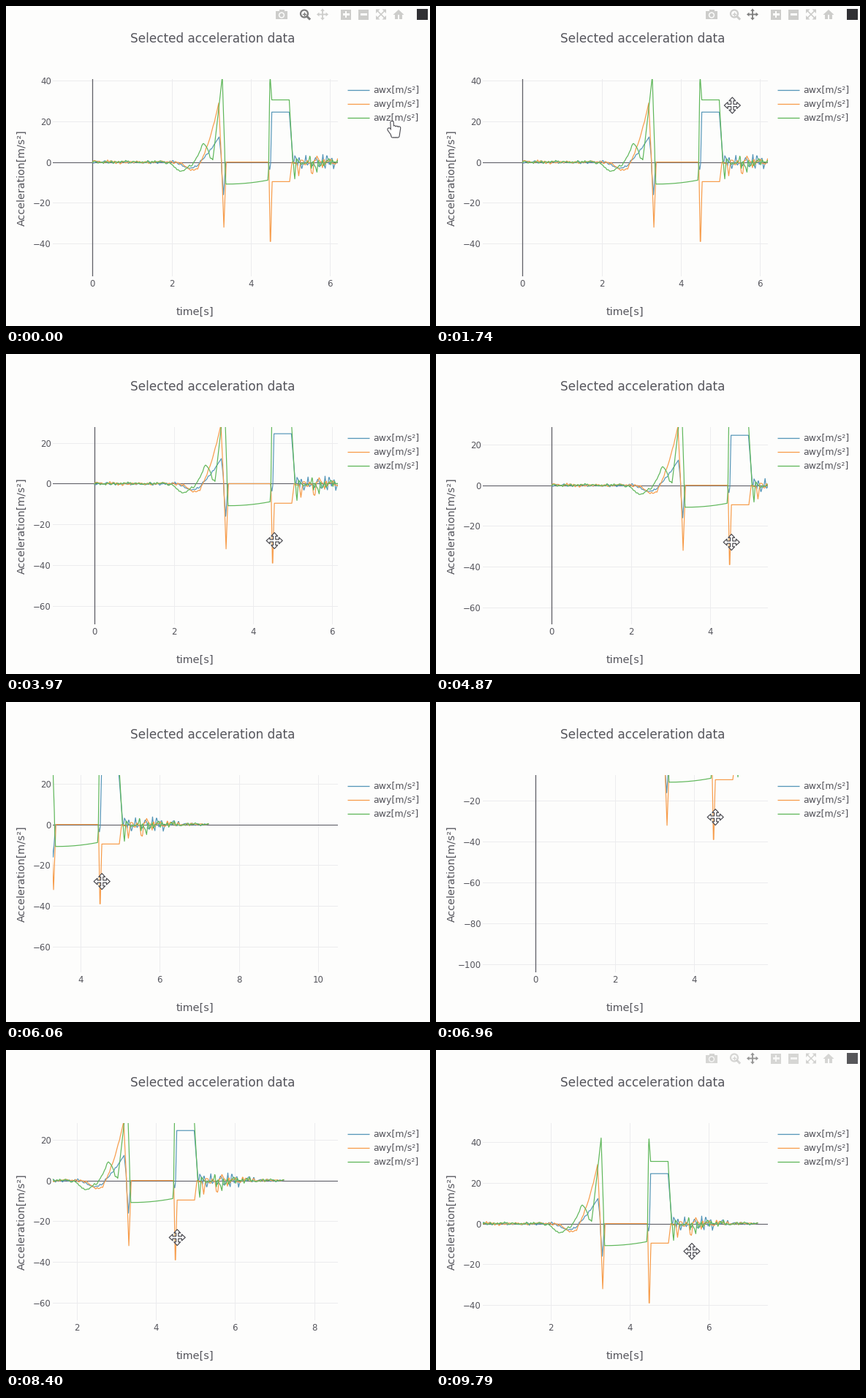
A matplotlib script for the animation above (9.84 s loop, 580x438 px).

```python
import matplotlib.pyplot as plt
import numpy as np
from matplotlib.animation import FuncAnimation
from matplotlib.patches import Circle, Polygon, Rectangle
from matplotlib.patheffects import Normal, Stroke
from matplotlib.ticker import MultipleLocator

W, H, DPI = 580, 438, 64
PT = 72 / DPI                      # points per pixel
FRAMES, STEP = 205, 48             # 9840 ms per loop
LEFT, RIGHT, TOP, BOTTOM = 64, 454, 100, 370
X_SCALE, Y_SCALE = 54.17, 2.79     # pixels per second, per m/s²

PAPER, INK, GRID, AXIS = "#fdfdfc", "#55555c", "#ececee", "#606068"
PALE, ACTIVE, DARK = "#cdcdcb", "#7c7c7c", "#303034"
BLUE, ORANGE, GREEN = "#5596b8", "#f79c4a", "#5fb75a"

plt.rcParams["font.family"] = "DejaVu Sans"
fig = plt.figure(figsize=(W / DPI, H / DPI), dpi=DPI, facecolor=PAPER)

# --- signals ---------------------------------------------------------------
t = np.arange(0, 7.24, 0.01)
rng = np.random.default_rng(5)


def bump(mid, width):
    return np.exp(-((t - mid) / width) ** 2)


def spike(mid, half):
    return np.clip(1 - abs(t - mid) / half, 0, 1)


def plateau(start, end, fall=0.03):
    return np.clip((t - start) / 0.03, 0, 1) * np.clip((end + fall - t) / fall, 0, 1)


def climb(start, peak, power):
    """Power curve up to the peak, then a steep drop."""
    up = np.clip((t - start) / (peak - start), 0, 1) ** power
    return up * np.clip((peak + 0.07 - t) / 0.07, 0, 1)


def noise():
    knots = np.arange(0, 7.3, 0.035)
    level = 0.4 * (t < 3.1) + (0.25 + 1.9 * bump(5.55, 0.75)) * (t > 5.08)
    return level * np.interp(t, knots, rng.normal(size=knots.size))


awx = (-3 * bump(2.45, 0.25) + 12.3 * climb(2.6, 3.2, 1.5)
       - 16 * spike(3.31, 0.06) - 4.3 * spike(4.475, 0.03)
       + 24.5 * plateau(4.5, 4.97, 0.1) + 5 * spike(5.82, 0.03))
awy = (-4 * bump(2.55, 0.25) + 29 * climb(2.55, 3.19, 2)
       - 32 * spike(3.32, 0.06) - 44.5 * spike(4.495, 0.04)
       - 9.6 * plateau(4.5, 4.98, 0.06) - 6 * spike(5.21, 0.05))
awz = (-4.4 * bump(2.25, 0.23) + 9 * bump(2.82, 0.15)
       + 42 * climb(3.04, 3.28, 1)
       + (2 * np.clip((t - 3.4) / 1.05, 0, 1) ** 2 - 10.8) * plateau(3.34, 4.43)
       + 30.5 * plateau(4.45, 4.97, 0.09) + 11 * spike(4.49, 0.04)
       - 3 * spike(5.11, 0.05))
SERIES = {"awx": (awx, BLUE), "awy": (awy, ORANGE), "awz": (awz, GREEN)}

# --- chart -----------------------------------------------------------------
chart = fig.add_axes([LEFT / W, 1 - BOTTOM / H,
                      (RIGHT - LEFT) / W, (BOTTOM - TOP) / H])
chart.set_facecolor("none")
chart.set_axisbelow(True)
chart.spines[:].set_visible(False)
chart.grid(color=GRID, linewidth=PT)
chart.xaxis.set_major_locator(MultipleLocator(2))
chart.yaxis.set_major_locator(MultipleLocator(20))
chart.tick_params(length=0, labelsize=11.7 * PT, labelcolor=INK)
chart.tick_params(axis="x", pad=4.5 * PT)
chart.tick_params(axis="y", pad=2 * PT)
chart.axhline(0, color=AXIS, linewidth=1.1 * PT, zorder=1)
chart.axvline(0, color=AXIS, linewidth=1.3 * PT, zorder=1)
for values, color in SERIES.values():
    chart.plot(t, values + noise(), color=color, linewidth=1.2 * PT, zorder=3)

# --- labels and legend -----------------------------------------------------
stage = fig.add_axes([0, 0, 1, 1], zorder=2)
stage.set(xlim=(0, W), ylim=(H, 0))
stage.axis("off")


def label(x, y, text, size, **kw):
    kw = {"ha": "center", "va": "center", "color": INK, **kw}
    return stage.text(x, y, text, fontsize=size * PT, **kw)


def stroke(xs, ys, color, width=1.0, **kw):
    return stage.plot(xs, ys, color=color, linewidth=width * PT, **kw)[0]


label(283, 45.5, "Selected acceleration data", 16.9)
label(258.5, 418.5, "time[s]", 14.4)
label(21.3, 235.5, "Acceleration[m/s²]", 14.3, rotation=90)
for i, (name, (_, color)) in enumerate(SERIES.items()):
    y = 114.5 + 19 * i
    stroke([467, 497], [y, y], color, 1.3, solid_capstyle="butt")
    label(502, y + 0.8, name + "[m/s²]", 12.5, ha="left")

# --- toolbar ---------------------------------------------------------------
MID = 11.5
toolbar = []


def add(artist):
    toolbar.append(artist)
    return artist


def shape(points, x):
    return add(stage.add_patch(
        Polygon(np.array(points) + (x, MID), closed=True, fc=PALE, ec="none")))


def box(x, w, h, color=PALE, dy=0.0):
    return add(stage.add_patch(
        Rectangle((x - w / 2, MID + dy - h / 2), w, h, fc=color, ec="none")))


def turn(points, k):
    """Rotate by k right angles."""
    for _ in range(k):
        points = [(-y, x) for x, y in points]
    return points


def four_way(shaft, head, neck, tip):
    arm = [(-shaft, -shaft), (-shaft, -neck), (-head, -neck),
           (0, -tip), (head, -neck), (shaft, -neck)]
    return np.array([p for k in range(4) for p in turn(arm, k)])


# camera
box(377, 16, 11, dy=1)
box(377, 7, 3, dy=-5.5)
add(stage.add_patch(Circle((377, MID + 1), 3.4, fc=PALE, ec=PAPER, lw=1.5 * PT)))
# magnifier
lens = add(stage.add_patch(Circle((408, MID - 1), 5, fc="none", lw=2.2 * PT)))
zoom_lines = [add(stroke([412, 415], [MID + 3, MID + 6], PALE, 3)),
              add(stroke([406, 410], [MID - 1, MID - 1], PALE, 1.4)),
              add(stroke([408, 408], [MID - 3, MID + 1], PALE, 1.4))]
# pan
pan = shape(four_way(0.9, 2.8, 4.6, 8), 433)
# zoom in, zoom out
for x in (465, 489):
    box(x, 14, 14)
    box(x, 9, 2.2, PAPER)
box(465, 2.2, 9, PAPER)
# autoscale
for k in range(4):
    shape(turn([(-7, -7), (-1.5, -7), (-7, -1.5)], k), 513)
for slope in (-1, 1):
    add(stroke([508, 518], [MID - 5 * slope, MID + 5 * slope], PALE, 1.6))
# home
shape([(-7.5, 0.5), (0, -6.5), (7.5, 0.5)], 537)
for dx in (-3.2, 3.2):
    box(537 + dx, 3.6, 6, dy=3)
# badge
box(569.5, 15, 15, DARK)

# --- pointers --------------------------------------------------------------
EDGE = "#4a4a50"
cross = four_way(1.6, 4.4, 6.2, 11)
move = stage.add_patch(Polygon(cross, closed=True, fc="white", ec=EDGE,
                               lw=1.2 * PT, joinstyle="round", zorder=9))

# hand: a pointing finger, three knuckles and a thumb as round-ended strokes
fingers = [(-3, -8.5, -2, 10)]
fingers += [(-3 + 3.2 * k, -2.8 + 0.6 * k, -2 + 2.3 * k, 10) for k in (1, 2, 3)]
fingers += [(-7, 1, -2, 8)]
hand_shape = np.array([p for x0, y0, x1, y1 in fingers
                       for p in ((x0, y0), (x1, y1), (np.nan, np.nan))])
hand = stroke([], [], "white", 3.2, solid_capstyle="round", zorder=9)
hand.set_path_effects([Stroke(linewidth=5.4 * PT, foreground=EDGE), Normal()])

# --- motion ----------------------------------------------------------------
GRAB = np.array([246, 78])         # pointer minus chart origin while dragging
PICK, PRESS, DROP = 1.15, 2.45, 9.45

# time, x, y
ORIGIN = [(PRESS, 118.2, 213.6), (3.08, 88.2, 175.6), (4.86, 158.2, 179.6),
          (6.05, -114.8, 167.6), (6.96, 136.2, 79.6), (8.4, -11.8, 178.6),
          (DROP, 48.2, 237.6)]
APPROACH = [(0.25, 531, 168), (1, 436, 21), (1.3, 436, 21), (2.25, 364, 291)]
LEAVE = [(DROP, 294, 315), (9.74, 350, 275.5)]


def glide(keys, now):
    """Ease in and out from key to key, held at both ends."""
    times, *axes = np.transpose(keys)
    now = np.clip(now, times[0], times[-1])
    i = min(np.searchsorted(times, now, side="right"), len(times) - 1)
    s = (now - times[i - 1]) / (times[i] - times[i - 1])
    s = s * s * (3 - 2 * s)
    return np.array([a[i - 1] + (a[i] - a[i - 1]) * s for a in axes])


def draw(n):
    now = n * STEP / 1000
    x0, y0 = origin = glide(ORIGIN, now)
    chart.set_xlim((LEFT - x0) / X_SCALE, (RIGHT - x0) / X_SCALE)
    chart.set_ylim((y0 - BOTTOM) / Y_SCALE, (y0 - TOP) / Y_SCALE)

    fade = max(1 - (now - PRESS) / 0.3, (now - 9.5) / 0.3)
    for part in toolbar:
        part.set_alpha(float(np.clip(fade, 0, 1)))
    zoom_color, pan_color = (ACTIVE, PALE) if now < PICK else (PALE, ACTIVE)
    lens.set_edgecolor(zoom_color)
    for line in zoom_lines:
        line.set_color(zoom_color)
    pan.set_facecolor(pan_color)

    if PRESS <= now < DROP:
        spot = origin + GRAB
    else:
        spot = glide(APPROACH if now < PRESS else LEAVE, now)
    hand.set_visible(now < 1.5)
    move.set_visible(now >= 1.5)
    hand.set_data(*(hand_shape + spot).T)
    move.set_xy(cross + spot)
    return []


anim = FuncAnimation(fig, draw, frames=FRAMES, interval=STEP,
                     init_func=lambda: draw(0), repeat=True, repeat_delay=0)
plt.show()
```
